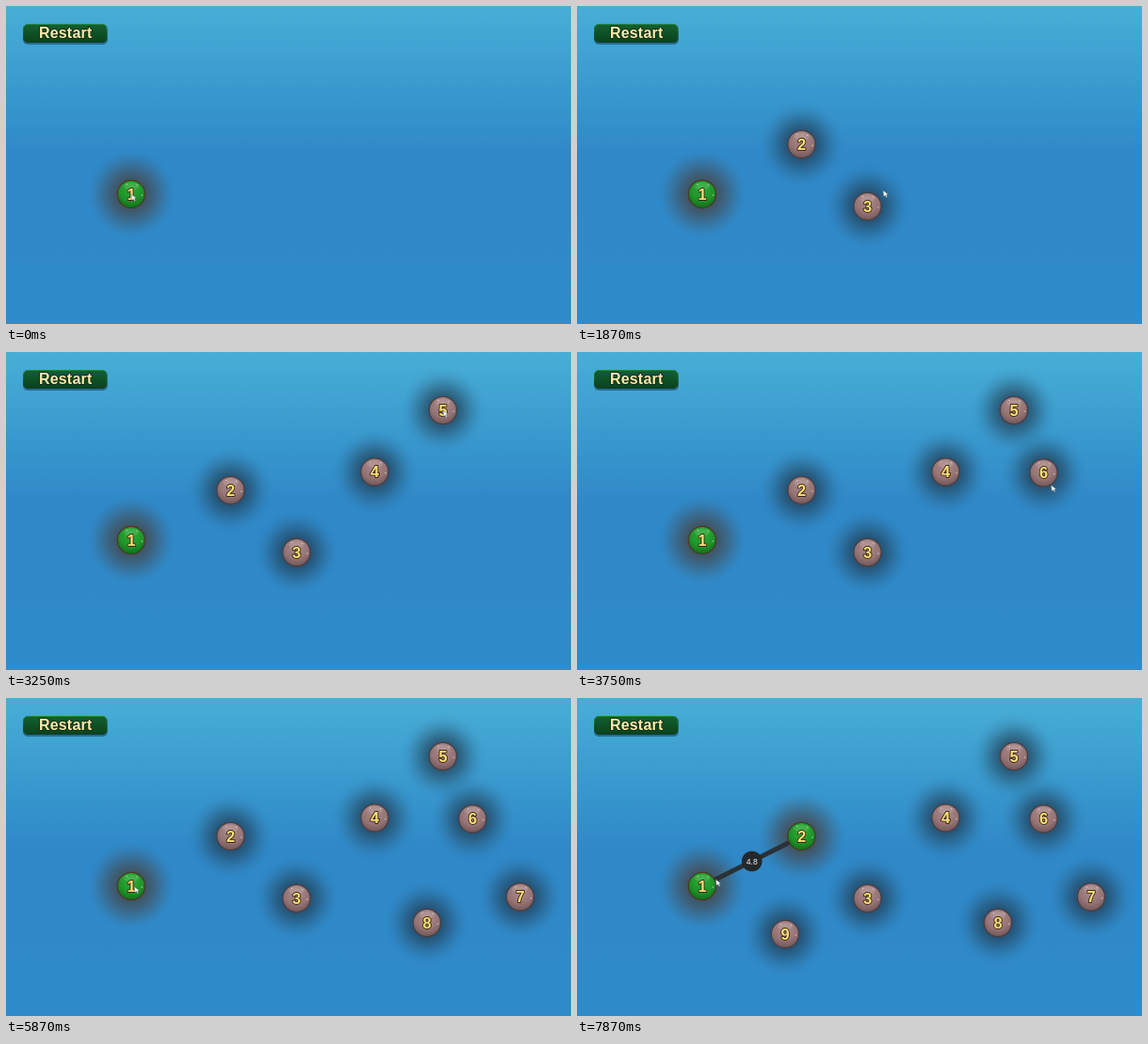
Write an HTML page that moves like this. It is 600 by 338 pixels and loops after 8000 ms.

```html
<!DOCTYPE html>
<html lang="en">
<head>
<meta charset="utf-8">
<title>Graph builder</title>
<style>
html, body { margin: 0; width: 100%; height: 100%; overflow: hidden; background: #308ac9; }
svg { display: block; width: 600px; height: 338px; }
text { font-family: "Liberation Sans", Arial, sans-serif; text-anchor: middle; paint-order: stroke; stroke-linejoin: round; }
.digit { font-size: 16.5px; font-weight: bold; fill: #fbdf78; stroke: #3a2a16; stroke-width: 1.8px; }
.title { font-size: 16px; font-weight: bold; letter-spacing: .2px; fill: #fbe9ae; stroke: #10300f; stroke-width: 1.8px; }
.weight { font-size: 8.6px; fill: #f2f2f2; }
</style>
</head>
<body>
<svg viewBox="0 0 600 338" xmlns="http://www.w3.org/2000/svg">
  <defs id="defs">
    <linearGradient id="sea" x2="0" y2="1">
      <stop offset="0" stop-color="#48aed6"/>
      <stop offset=".14" stop-color="#40a3d2"/>
      <stop offset=".3" stop-color="#3796cd"/>
      <stop offset=".48" stop-color="#2f88c7"/>
      <stop offset="1" stop-color="#308bca"/>
    </linearGradient>
    <linearGradient id="btn" x2="0" y2="1">
      <stop offset="0" stop-color="#136030"/>
      <stop offset="1" stop-color="#0a421d"/>
    </linearGradient>
    <linearGradient id="rim" x2="0" y2="1">
      <stop offset="0" stop-color="#238546"/>
      <stop offset="1" stop-color="#0c3d26"/>
    </linearGradient>
    <radialGradient id="green" cx=".5" cy=".3" r=".72">
      <stop offset="0" stop-color="#2bae36"/>
      <stop offset=".6" stop-color="#1f9429"/>
      <stop offset="1" stop-color="#126a1a"/>
    </radialGradient>
    <radialGradient id="brown" cx=".5" cy=".3" r=".72">
      <stop offset="0" stop-color="#ae8b8c"/>
      <stop offset=".6" stop-color="#957475"/>
      <stop offset="1" stop-color="#6f5456"/>
    </radialGradient>
  </defs>
  <rect width="600" height="338" fill="url(#sea)"/>
  <rect x="18" y="20.5" width="90" height="20.5" rx="5" fill="#123f63" opacity=".55"/>
  <rect x="18.5" y="19.5" width="88.5" height="19" rx="4.5" fill="url(#btn)" stroke="url(#rim)"/>
  <text class="title" x="63.2" y="34">Restart</text>
  <g id="halos"></g>
  <g id="edge"></g>
  <g id="balls"></g>
  <path id="cursor" d="M0 0L.8 6.6L2.3 5.2L3.6 7.4L4.7 6.8L3.5 4.7L5.5 4.3Z" fill="#f4f6f8" stroke="#4a5a66" stroke-width=".4"/>
</svg>
<script>
const LOOP = 8000, STEP = 125, LINK = 61;
const nodes = [
  [133, 200], [238.5, 147], [308.5, 213], [391.5, 127.5], [464, 62],
  [495.5, 128.5], [546, 211.5], [447, 239], [221, 251]
];
// Pointer stops: node, step. The first stop at a node places it.
const tour = [
  [0, 0], [1, 8], [2, 13], [3, 20], [4, 26], [5, 29], [6, 33], [7, 36], [7, 39],
  [0, 47.5], [8, 51], [0, 55], [1, LINK], [0, 63.6], [0, LOOP / STEP]
];
const $ = id => document.getElementById(id);
const ease = f => f * f * (3 - 2 * f);

function add(parent, tag, attrs, text) {
  const el = document.createElementNS("http://www.w3.org/2000/svg", tag);
  for (const k in attrs) el.setAttribute(k, attrs[k]);
  if (text) el.textContent = text;
  return parent.appendChild(el);
}

function haloFill(id, color, alpha, power) {
  const g = add($("defs"), "radialGradient", { id });
  for (let r = 0; r <= 1; r += 1 / 16)
    add(g, "stop", {
      offset: r, "stop-color": color,
      "stop-opacity": alpha * Math.cos(r * Math.PI / 2) ** power
    });
}
haloFill("warm", "#474241", .9, 1.5);
haloFill("cool", "#20384a", .86, 2);

const views = nodes.map(([x, y], i) => {
  const at = `translate(${x} ${y})`;
  const halo = add($("halos"), "circle", { r: 47, transform: at });
  const group = add($("balls"), "g", { transform: at });
  const ball = add(group, "circle", { r: 14.6, "stroke-width": 1.2 });
  add(group, "ellipse", { cy: -8.5, rx: 8.5, ry: 4, fill: "#fff", opacity: .12 });
  for (const a of [-2, -1, 0.1])
    add(group, "circle", { cx: 11.5 * Math.cos(a), cy: 11.5 * Math.sin(a), r: .8, fill: "#fff", opacity: .5 });
  add(group, "text", { class: "digit", y: 5.9 }, String(i + 1));
  return { halo, group, ball, start: tour.find(stop => stop[0] === i)[1] };
});

function link([x0, y0], [x1, y1], label) {
  const x = (x0 + x1) / 2, y = (y0 + y1) / 2;
  add($("edge"), "path", { d: `M${x0} ${y0}L${x1} ${y1}`, stroke: "#2a3136", "stroke-width": 5 });
  add($("edge"), "circle", { cx: x, cy: y, r: 10.8, fill: "#23282c" });
  add($("edge"), "text", { class: "weight", x, y: y + 3.2 }, label);
}
link(nodes[0], nodes[1], "4.8");

function pointer(n) {
  const k = tour.findIndex(stop => stop[1] > n);
  const [from, a] = tour[k - 1], [to, b] = tour[k];
  const f = ease((n - a) / (b - a));
  return nodes[from].map((v, axis) => v + (nodes[to][axis] - v) * f);
}

function draw(n) {
  const linked = n >= LINK;
  views.forEach(({ halo, group, ball, start }, i) => {
    const active = i === 0 || (i === 1 && linked);
    halo.style.visibility = group.style.visibility = n >= start ? "visible" : "hidden";
    halo.setAttribute("fill", active ? "url(#warm)" : "url(#cool)");
    ball.setAttribute("fill", active ? "url(#green)" : "url(#brown)");
    ball.setAttribute("stroke", active ? "#4a3a22" : "#4b3d42");
  });
  $("edge").style.visibility = linked ? "visible" : "hidden";
  $("cursor").setAttribute("transform", `translate(${pointer(n)})`);
}

const t0 = performance.now();
let last = -1;
function tick() {
  const t = (performance.now() - t0) % LOOP;
  // 5 ms of slack: steps fall on whole hundredths of a second
  const n = Math.floor((t + 5) / STEP) % (LOOP / STEP);
  if (n !== last) draw(last = n);
  requestAnimationFrame(tick);
}
tick();
</script>
</body>
</html>
```
